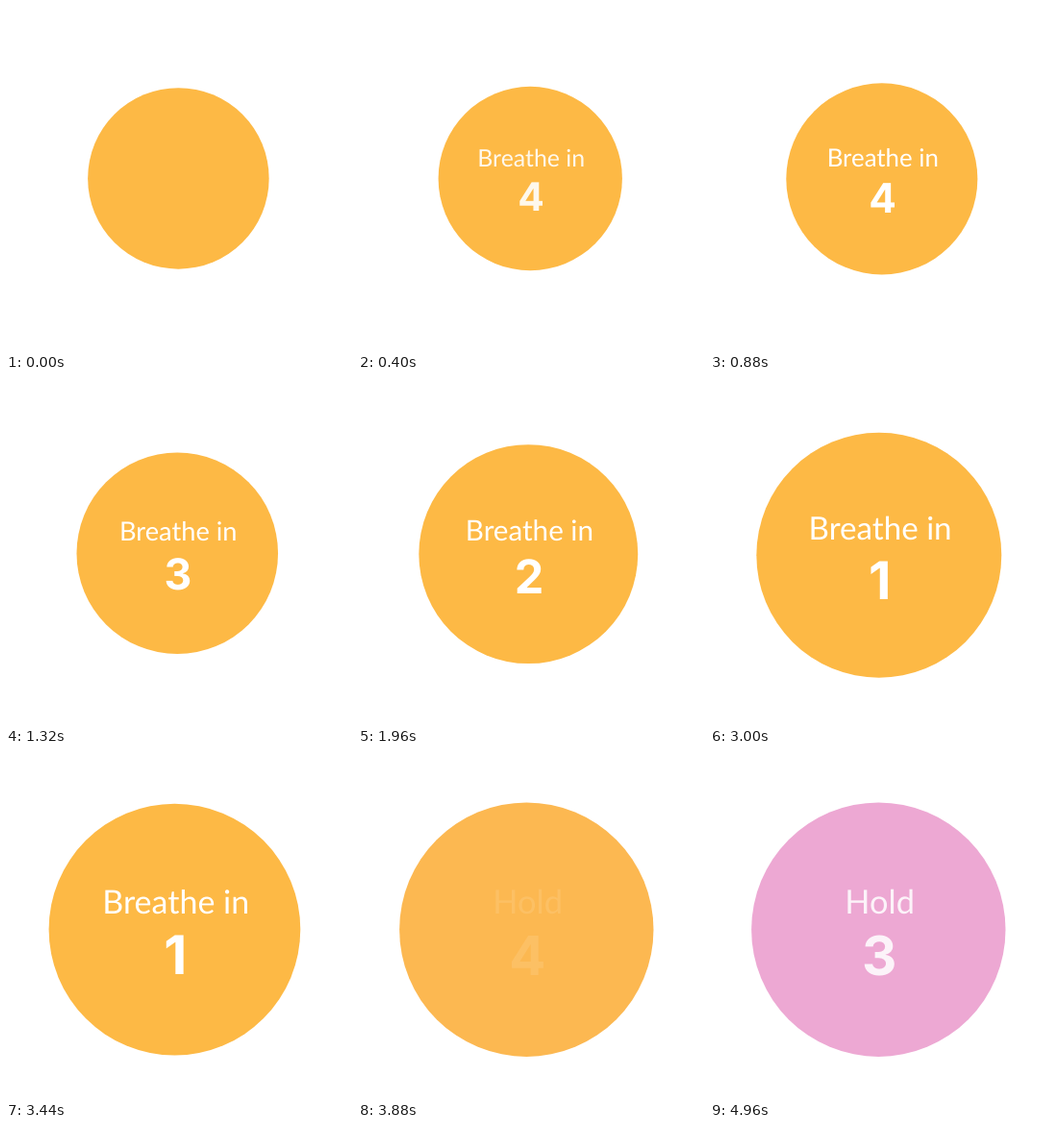
Animation, 360 px wide and 360 px high, one loop 5000 ms. Source, as an HTML page:

```html
<!DOCTYPE html>
<html lang="en">
<head>
<meta charset="utf-8">
<title>Breathing guide</title>
<style>
  html, body { margin: 0; height: 100%; overflow: hidden; background: #fff; }
  svg { display: block; width: 100vw; height: 100vh; }
  text { fill: #fff; text-anchor: middle; text-rendering: geometricPrecision; }
  #label { font: 26px Lato, sans-serif; }
  #count { font: 700 42.6px Inter, sans-serif; }
</style>
</head>
<body>
<svg viewBox="0 0 360 360">
  <g id="bubble">
    <circle id="disc" r="100"/>
    <g id="words">
      <text id="label" x="1" y="-12.8"></text>
      <text id="count" x="0.7" y="35.5"></text>
    </g>
  </g>
</svg>
<script>
const LOOP = 5000, HOLD_START = 3830, FADE = 400;
const ORANGE = [253, 185, 69], PINK = [237, 168, 211];
const [bubble, disc, words, label, count] =
  ['bubble', 'disc', 'words', 'label', 'count'].map(id => document.getElementById(id));

const clamp = v => Math.min(1, Math.max(0, v));
const mix = (a, b, k) => a + (b - a) * k;
const ramp = (t, start, length) => clamp((t - start) / length);

function draw(t) {
  // The breath is already slightly under way when the loop begins.
  const grow = (1 - Math.cos(Math.PI * clamp((t + 105) / 4030))) / 2;
  const radius = mix(94.2, 132.2, grow);
  const x = mix(179.4, 175.3, grow), y = mix(179.4, 182.7, grow);
  bubble.setAttribute('transform', `translate(${x} ${y}) scale(${radius / 100})`);

  const tint = ramp(t, HOLD_START, 600);
  disc.setAttribute('fill', `rgb(${ORANGE.map((c, i) => mix(c, PINK[i], tint))})`);

  const holding = t >= HOLD_START;
  label.textContent = holding ? 'Hold' : 'Breathe in';
  count.textContent = holding
    ? (t < 4900 ? 4 : 3)
    : 4 - Math.min(3, Math.floor((t + 100) / 1000));
  const opacity = holding
    ? 0.87 * ramp(t, HOLD_START, FADE)
    : ramp(t, 40, FADE) * (1 - ramp(t, 3480, 320));
  words.setAttribute('opacity', opacity);
}

function tick() {
  draw(performance.now() % LOOP);
  requestAnimationFrame(tick);
}
tick();
</script>
</body>
</html>
```
